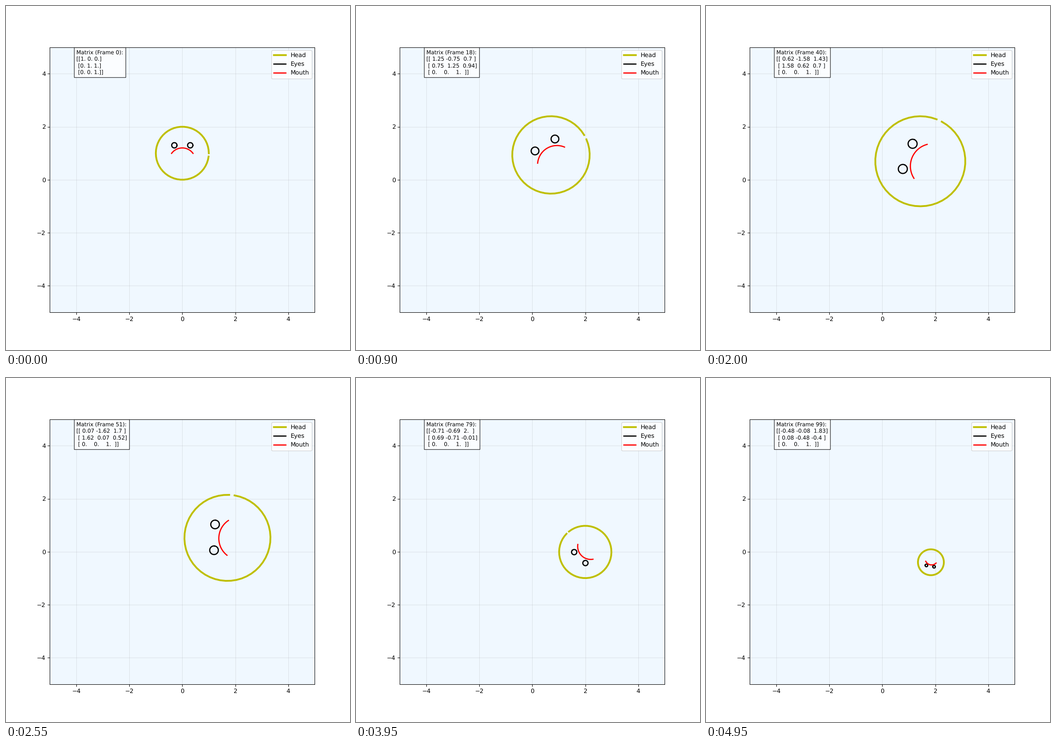
A matplotlib script for the animation above (5 s loop, 748 by 748 pixels).

```python
import numpy as np
import matplotlib.pyplot as plt
from matplotlib.animation import FuncAnimation

FRAMES = 100
INTERVAL = 50

# Unhinted glyphs keep fractional heights and widths.
plt.rcParams["text.hinting"] = "none"


def arc(cx, cy, r, angles):
    """Homogeneous points on a circle around (cx, cy)."""
    return np.array([cx + r * np.cos(angles),
                     cy + r * np.sin(angles),
                     np.ones_like(angles)])


def transform(i):
    """Rotate, pulse in size and drift along an ellipse."""
    angle = 0.03 * i
    scale = 1 + 0.7 * np.sin(0.04 * i)
    c, s = scale * np.cos(angle), scale * np.sin(angle)
    return np.array([[c, -s, 2 * np.sin(0.02 * i)],
                     [s, c, np.cos(0.02 * i)],
                     [0, 0, 1]])


turn = np.linspace(0, 2 * np.pi, 50, endpoint=False)
smile = np.linspace(0.2 * np.pi, 0.8 * np.pi, 50)

fig, ax = plt.subplots(figsize=(8, 8), dpi=93.5)
ax.set_xlim(-5, 5)
ax.set_ylim(-5, 5)
ax.set_aspect("equal")
ax.set_facecolor("aliceblue")
ax.grid(True, alpha=0.3)

head, = ax.plot([], [], "y-", lw=3, label="Head")
left_eye, = ax.plot([], [], "k-", lw=2, label="Eyes")
right_eye, = ax.plot([], [], "k-", lw=2)
mouth, = ax.plot([], [], "r-", lw=2, label="Mouth")
legend = ax.legend(loc="upper right", labelspacing=0.53)
for handle in legend.get_lines():
    handle.set_snap(False)
info = ax.text(-4, 4, "", fontsize=9.1, linespacing=1.3,
               bbox=dict(facecolor="white", alpha=0.8))

parts = [
    (head, arc(0, 0, 1, turn)),
    (left_eye, arc(-0.3, 0.3, 0.1, turn)),
    (right_eye, arc(0.3, 0.3, 0.1, turn)),
    (mouth, arc(0, -0.3, 0.5, smile)),
]


def update(i):
    m = transform(i)
    for line, points in parts:
        x, y, _ = m @ points
        line.set_data(x, y)
    # Adding zero turns -0 into 0 for printing.
    info.set_text(f"Matrix (Frame {i}):\n{np.round(m, 2) + 0.0}")
    return [line for line, _ in parts] + [info]


anim = FuncAnimation(fig, update, frames=FRAMES, interval=INTERVAL,
                     repeat=True, repeat_delay=0)
plt.show()
```
